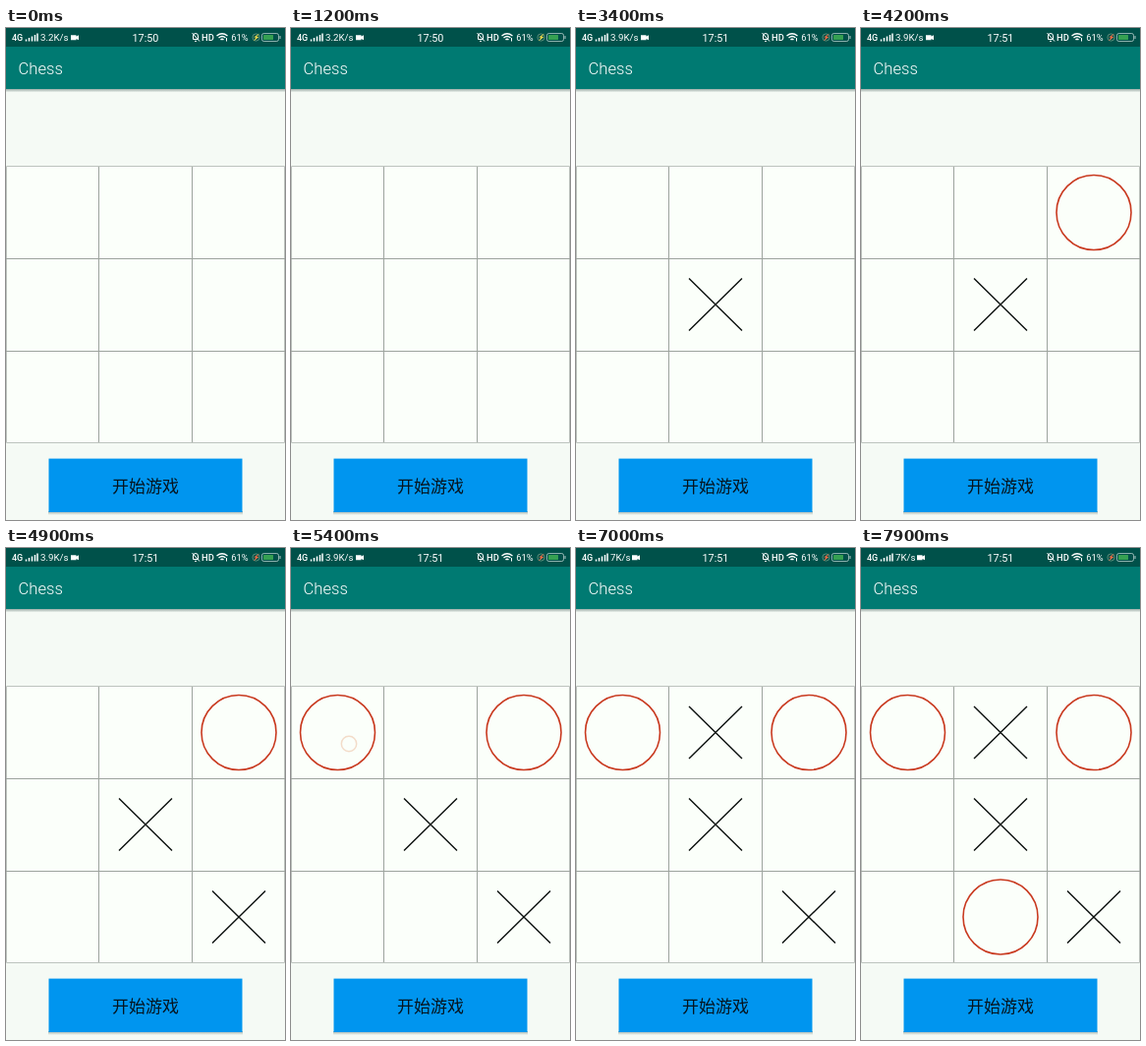
Write an HTML page without scripts that moves like this. It is 284 by 500 pixels and loops after 8 s.

```html
<!DOCTYPE html>
<html lang="zh">
<head>
<meta charset="utf-8">
<title>Noughts and crosses</title>
<style>
  html, body { margin: 0; width: 100%; height: 100%; overflow: hidden; background: #f5faf5; }
  svg { display: block; width: 284px; height: 500px; }
  text { font-family: Roboto, "Noto Sans", sans-serif; fill: #fff; }
  .title { font-size: 16.6px; font-weight: 300; }
  .status { font-size: 9.7px; }
  .grid { fill: none; stroke: #9da39e; }
  .frame { fill: none; stroke: #bdc3be; }
  .nought { fill: none; stroke: #c93a20; stroke-width: 1.6; }
  .cross { fill: none; stroke: #0a0f0d; stroke-width: 1.4; }
  .touch { fill: none; stroke: #f3dcc9; stroke-width: 1.5; }
  .label { font: 500 17px "Noto Sans CJK SC", "Noto Sans CJK", sans-serif; fill: #06141d; }
  .icon { fill: none; stroke: #fff; }
</style>
</head>
<body>
<svg viewBox="0 0 284 500">
  <defs>
    <linearGradient id="shade" x2="0" y2="1">
      <stop stop-color="#5f7772" stop-opacity=".6"/>
      <stop offset="1" stop-color="#5f7772" stop-opacity="0"/>
    </linearGradient>
    <circle id="o" r="38" class="nought"/>
    <path id="x" d="M-27-27 27 26M27-27-27 26" class="cross"/>
    <path id="camera" d="M0 7.2h5.5v1.3l2.5-1.3v5l-2.5-1.3v1.3H0z" fill="#fff"/>
    <g id="bolt">
      <circle cx="254.5" cy="9.5" r="3.6" fill="none" stroke="#6f9a83" stroke-width=".8"/>
      <path d="M258 5.5l-6 4h2.3l-2.3 4 5.5-4.5h-2.3z"/>
    </g>
  </defs>

  <rect width="284" height="500" fill="#f5faf5"/>
  <rect y="62" width="284" height="3.5" fill="url(#shade)"/>
  <rect width="284" height="62" fill="#007a72"/>
  <rect width="284" height="19" fill="#00514a"/>
  <text x="12.5" y="47.2" class="title">Chess</text>

  <!-- Status bar -->
  <g class="status">
    <text x="6" y="13.3" font-size="9" font-weight="500">4G</text>
    <path d="M20.5 13.5v-2M23.5 13.5v-3.5M26.5 13.5v-5M29.5 13.5v-6.5M32 13.5v-8" class="icon" stroke-width="1.5"/>
    <g>
      <text x="35" y="13.2">3.2K/s</text><use href="#camera" x="66"/>
      <animate attributeName="visibility" values="visible;hidden" keyTimes="0;.225" calcMode="discrete" dur="8s" repeatCount="indefinite"/>
    </g>
    <g visibility="hidden">
      <text x="35" y="13.2">18.3K/s</text><use href="#camera" x="70.5"/>
      <animate attributeName="visibility" values="hidden;visible;hidden" keyTimes="0;.225;.4125" calcMode="discrete" dur="8s" repeatCount="indefinite"/>
    </g>
    <g visibility="hidden">
      <text x="35" y="13.2">3.9K/s</text><use href="#camera" x="66"/>
      <animate attributeName="visibility" values="hidden;visible;hidden" keyTimes="0;.4125;.85" calcMode="discrete" dur="8s" repeatCount="indefinite"/>
    </g>
    <g visibility="hidden">
      <text x="35" y="13.2">7K/s</text><use href="#camera" x="57"/>
      <animate attributeName="visibility" values="hidden;visible" keyTimes="0;.85" calcMode="discrete" dur="8s" repeatCount="indefinite"/>
    </g>

    <g font-size="10.8" text-anchor="middle">
      <g>
        <text x="142" y="13.6">17:50</text><use href="#bolt" fill="#f0d84a"/>
        <animate attributeName="visibility" values="visible;hidden" keyTimes="0;.4125" calcMode="discrete" dur="8s" repeatCount="indefinite"/>
      </g>
      <g visibility="hidden">
        <text x="142" y="13.6">17:51</text><use href="#bolt" fill="#ef6a43"/>
        <animate attributeName="visibility" values="hidden;visible" keyTimes="0;.4125" calcMode="discrete" dur="8s" repeatCount="indefinite"/>
      </g>
    </g>

    <path d="M190.5 11.5V8q0-2.5 2.5-2.5T195.5 8v3.5zM189.5 5l7.5 8.5M192 13.3h2" class="icon"/>
    <text x="199" y="13.2" font-size="9.4" font-weight="500">HD</text>
    <path d="M214.5 8q5.5-4.5 11 0M216.5 10q3.5-3 7 0M218.5 12q1.5-1.5 3 0" class="icon" stroke-width="1.3"/>
    <path d="M224.5 10v3.5" class="icon"/>
    <text x="229.3" y="13.2" font-size="9.3">61%</text>
    <rect x="260.5" y="5.5" width="17" height="8" rx="2" class="icon" stroke-opacity=".55"/>
    <rect x="262" y="7" width="10" height="5" rx=".5" fill="#35a052"/>
    <path d="M279 8v3" class="icon" stroke-opacity=".7"/>
  </g>

  <!-- Board -->
  <rect y="140" width="284" height="282" fill="#fbfffa"/>
  <path d="M.5 140.5h283v281H.5z" class="frame"/>
  <path d="M94.5 141v280M189.5 141v280M0 234.5h284M0 328.5h284" class="grid"/>

  <use href="#x" x="142" y="281.5" visibility="hidden">
    <animate attributeName="visibility" values="hidden;visible" keyTimes="0;.3625" calcMode="discrete" dur="8s" repeatCount="indefinite"/>
  </use>
  <use href="#o" x="237" y="187.5" visibility="hidden">
    <animate attributeName="visibility" values="hidden;visible" keyTimes="0;.4625" calcMode="discrete" dur="8s" repeatCount="indefinite"/>
  </use>
  <use href="#x" x="237" y="375.5" visibility="hidden">
    <animate attributeName="visibility" values="hidden;visible" keyTimes="0;.575" calcMode="discrete" dur="8s" repeatCount="indefinite"/>
  </use>
  <use href="#o" x="47.5" y="187.5" visibility="hidden">
    <animate attributeName="visibility" values="hidden;visible" keyTimes="0;.6625" calcMode="discrete" dur="8s" repeatCount="indefinite"/>
  </use>
  <use href="#x" x="142" y="188" visibility="hidden">
    <animate attributeName="visibility" values="hidden;visible" keyTimes="0;.7875" calcMode="discrete" dur="8s" repeatCount="indefinite"/>
  </use>
  <use href="#o" x="142" y="375" visibility="hidden">
    <animate attributeName="visibility" values="hidden;visible" keyTimes="0;.9" calcMode="discrete" dur="8s" repeatCount="indefinite"/>
  </use>

  <!-- Finger taps -->
  <circle cx="59" cy="199" r="7.7" class="touch" visibility="hidden">
    <animate attributeName="visibility" values="hidden;visible;hidden" keyTimes="0;.6625;.6875" calcMode="discrete" dur="8s" repeatCount="indefinite"/>
  </circle>
  <circle cx="159" cy="188.5" r="7.7" class="touch" visibility="hidden">
    <animate attributeName="visibility" values="hidden;visible;hidden" keyTimes="0;.7625;.7875" calcMode="discrete" dur="8s" repeatCount="indefinite"/>
  </circle>

  <!-- Start button -->
  <rect x="43" y="491" width="198" height="4" fill="url(#shade)"/>
  <rect x="43.5" y="437.6" width="197" height="54.4" fill="#0095ef"/>
  <text x="142" y="471.7" class="label" text-anchor="middle">开始游戏</text>
</svg>
</body>
</html>
```
